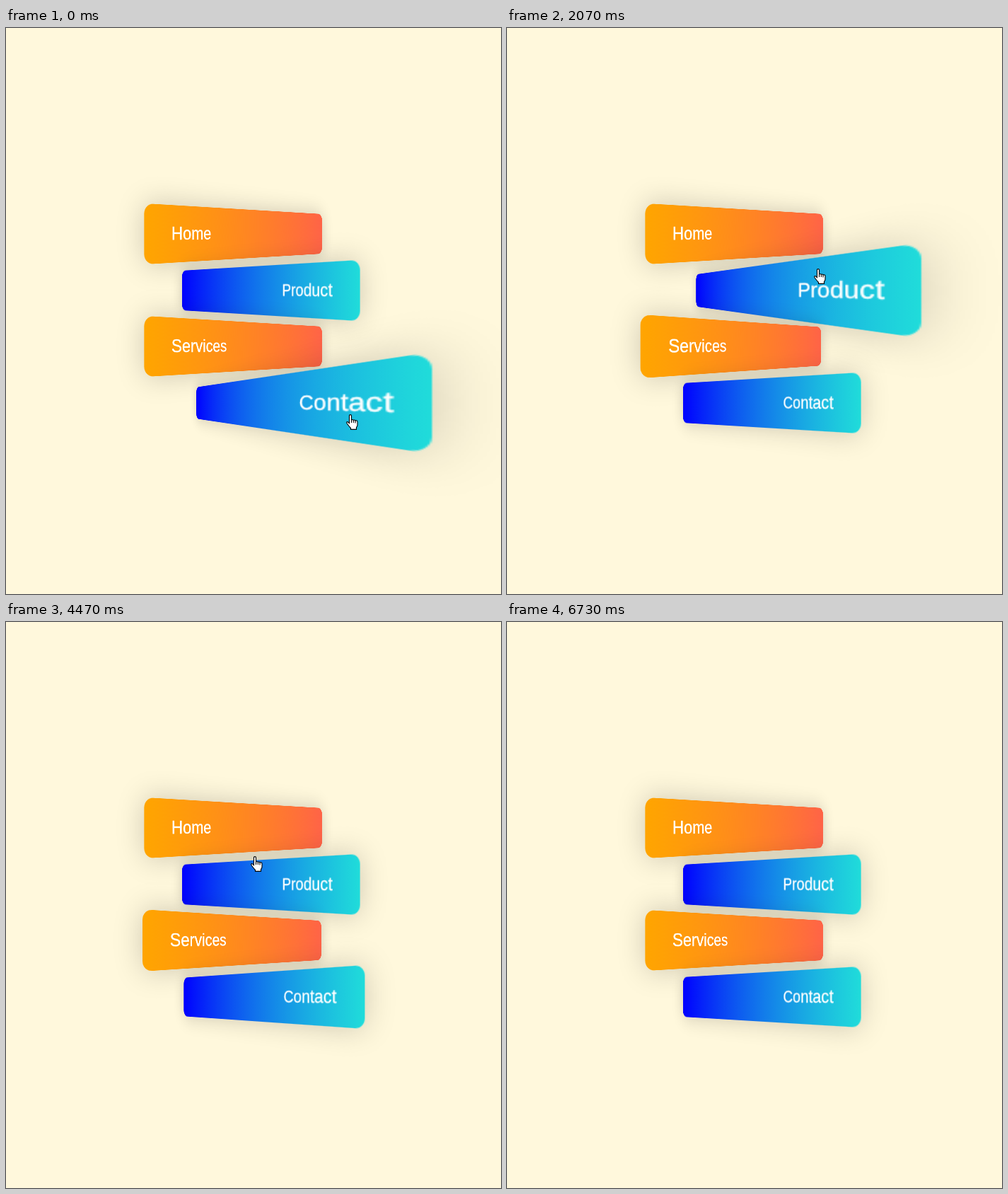
Animation, 700 px wide and 800 px high, one loop 7.47 s. Source, as an HTML page:

```html
<!DOCTYPE html>
<html lang="en">
<head>
<meta charset="utf-8">
<title>Perspective menu</title>
<style>
  html, body { margin: 0; width: 100%; height: 100%; overflow: hidden; background: cornsilk; }
  #stage { position: absolute; left: 0; top: 0; width: 700px; height: 800px; overflow: hidden; }
  .item {
    position: absolute; box-sizing: border-box; color: #fff; white-space: nowrap;
    font-family: "Liberation Sans", Arial, Helvetica, sans-serif;
    -webkit-text-stroke: .3px #fff;
    background: linear-gradient(to right, orange, tomato);
  }
  .item.even { text-align: right; background: linear-gradient(to right, blue, #20dcda); }
  #hand { position: absolute; left: 0; top: 0; width: 17px; height: 23px; overflow: visible; }
</style>
</head>
<body>
<div id="stage">
  <svg id="hand" viewBox="0 0 17 23" fill="#fff" stroke="#000" stroke-width="1.1" stroke-linejoin="round" stroke-linecap="round">
    <path d="M4.5 13V2Q4.5 .6 6 .6T7.5 2V8Q9 6.9 10.3 8.3Q11.8 7.4 13 8.9Q16 8.2 16 11V15Q16 17 14.5 18.5V21.4H6.5V19.5Q4.5 17.5 1.2 13Q.2 11 1.6 10.6Q3 10.4 4.5 13Z"/>
    <path fill="none" d="M7.5 8V11.5M10.3 8.5V11.5M13 9V12"/>
  </svg>
</div>
<script>
const LOOP = 7470, STEP = 200 / 3, FADE = 500, HAND_END = 6700;
const ZOOM = 1.132, W = 300 * ZOOM, H = 60 * ZOOM;
const CENTER_X = 347.8, FIRST_Y = 290.8, PITCH = 79.66;

// Each visit is the time the pointer enters and leaves the button.
const items = [
  { label: "Home", visits: [[2635, 3680]] },
  { label: "Product", visits: [[1768, 2630], [3740, 3900]] },
  { label: "Services", visits: [[870, 1760], [3924, 4175], [4994, 5244]] },
  { label: "Contact", visits: [[-425, 830], [4190, 4340], [5250, 5330]] }
];

// Key points of the pointer tip: time, x, y.
const path = [
  [600, 487, 547], [1467, 242, 451], [2067, 440, 341], [2570, 446, 336],
  [2933, 238, 288], [3400, 234, 286], [4000, 355, 455], [4260, 345, 510],
  [4680, 360, 148], [4850, 352, 148], [5067, 322, 472], [5733, 351, 603],
  [6133, 132, 691], [6333, 132, 691], [6733, 78, 800]
];

const clamp = v => Math.max(0, Math.min(1, v));
const mix = (a, b, k) => a + (b - a) * k;
const px = v => v + "px";

// The CSS "ease" curve: cubic-bezier(.25, .1, .25, 1).
function ease(x) {
  if (x <= 0 || x >= 1) return clamp(x);
  const curve = (a, b, u) => 3 * a * u * (1 - u) ** 2 + 3 * b * u * u * (1 - u) + u ** 3;
  let lo = 0, hi = 1;
  for (let i = 0; i < 24; i++) {
    const mid = (lo + hi) / 2;
    if (curve(0.25, 0.25, mid) < x) lo = mid; else hi = mid;
  }
  return curve(0.1, 1, lo);
}

// A button left early falls back in proportionally less time.
function visitAmount([enter, leave], t) {
  if (t < enter) return 0;
  const peak = ease((Math.min(t, leave) - enter) / FADE);
  return t <= leave ? peak : peak * (1 - ease((t - leave) / (FADE * peak)));
}

function pointer(t) {
  const i = Math.max(1, path.findIndex(p => p[0] >= t));
  const [t0, x0, y0] = path[i - 1], [t1, x1, y1] = path[i];
  const k = clamp((t - t0) / (t1 - t0));
  return [mix(x0, x1, k), mix(y0, y1, k)];
}

const stage = document.getElementById("stage");
const hand = document.getElementById("hand");

items.forEach((item, i) => {
  const el = item.el = document.createElement("div");
  el.className = i % 2 ? "item even" : "item";
  el.textContent = item.label;
  Object.assign(el.style, {
    left: px(CENTER_X - W / 2), top: px(FIRST_Y + PITCH * i - H / 2),
    width: px(W), height: px(H), lineHeight: px(H),
    fontSize: px(20 * ZOOM), borderRadius: px(10 * ZOOM),
    boxShadow: `0 0 ${30 * ZOOM}px rgba(0,0,0,.2)`
  });
  stage.insertBefore(el, hand);
});

function draw(t) {
  items.forEach((item, i) => {
    const e = Math.max(...item.visits.map(v => visitAmount(v, t)));
    const depth = ZOOM / mix(1 / 500, 1 / 200, e);
    item.el.style.padding = `0 ${mix(31.5, 16.5, e) * ZOOM}px`;
    item.el.style.transform = `perspective(${depth}px) rotateY(${i % 2 ? -45 : 45}deg)`;
  });
  const [x, y] = pointer(t);
  hand.style.transform = `translate(${Math.round(x - 6)}px, ${Math.round(y - 1)}px)`;
  hand.style.display = t < HAND_END ? "block" : "none";
}

const begin = performance.now();
function tick() {
  const t = (performance.now() - begin) % LOOP;
  draw(Math.min(111, Math.floor((t + 5) / STEP)) * STEP);
  requestAnimationFrame(tick);
}
draw(0);
requestAnimationFrame(tick);
</script>
</body>
</html>
```
